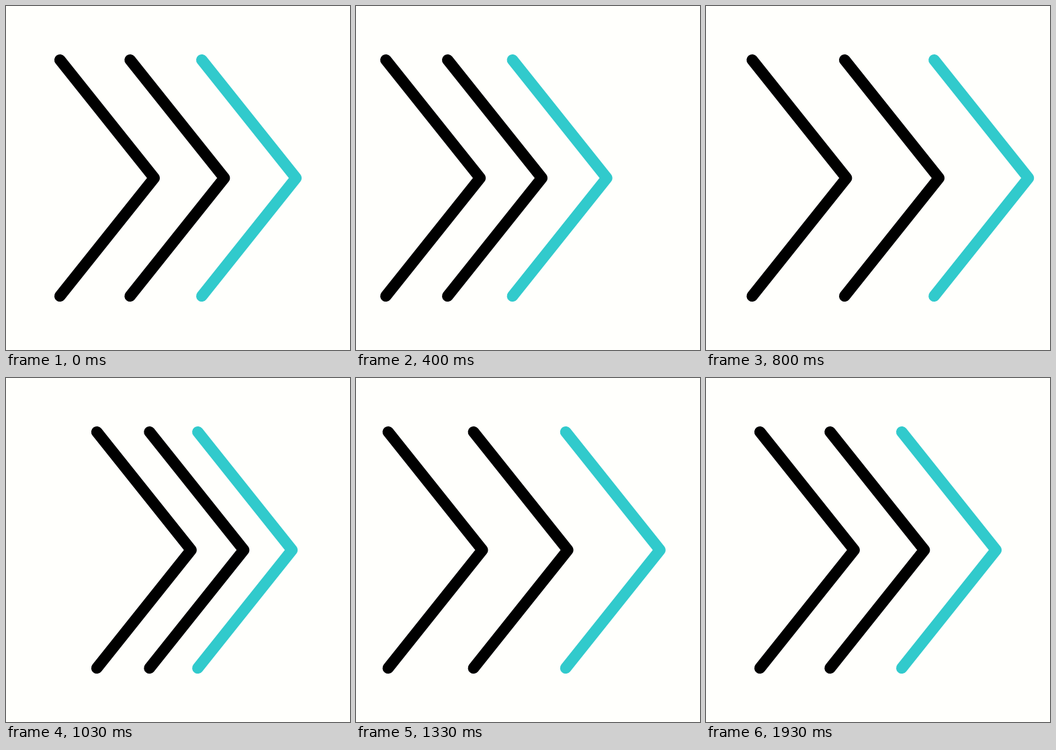
These frames come from a looping animation (512x512 px, 2010 ms). An HTML page with a canvas:

```html
<!DOCTYPE html>
<html lang="en">
<head>
<meta charset="utf-8">
<title>Chevrons</title>
<style>
html, body { margin: 0; width: 100%; height: 100%; overflow: hidden; background: #fffffc; }
canvas { display: block; width: 100vw; height: 100vh; }
</style>
</head>
<body>
<canvas id="stage" width="512" height="512"></canvas>
<script>
const ctx = document.getElementById('stage').getContext('2d');
const LOOP = 2010;
const FPS = 30;

// [step, horizontal offset]
const keys = [[0, 0], [15, -65.2], [26, 59], [34, -36], [35, -36], [43, 47], [50, 0]];

const chevrons = [
  { x: 80.3, delay: 4, color: '#000' },
  { x: 184.7, delay: 2, color: '#000' },
  { x: 291.4, delay: 0, color: '#31cacc' }
];

const ease = p => p * p * (3 - 2 * p);

function offset(step) {
  if (step <= 0) return 0;
  for (let i = 1; i < keys.length; i++) {
    const [t0, v0] = keys[i - 1];
    const [t1, v1] = keys[i];
    if (step <= t1) return v0 + (v1 - v0) * ease((step - t0) / (t1 - t0));
  }
  return 0;
}

function drawChevron(x, color) {
  ctx.strokeStyle = color;
  ctx.beginPath();
  ctx.moveTo(x, 80.3);
  ctx.lineTo(x + 140.3, 256);
  ctx.lineTo(x, 431.7);
  ctx.stroke();
}

function draw(ms) {
  // The motion advances in 30 steps per second
  const step = Math.floor((ms % LOOP + 4) * FPS / 1000);
  ctx.fillStyle = '#fffffc';
  ctx.fillRect(0, 0, 512, 512);
  ctx.lineWidth = 16.8;
  ctx.lineCap = ctx.lineJoin = 'round';
  for (const c of chevrons) drawChevron(c.x + offset(step - c.delay), c.color);
}

const start = performance.now();
function tick() {
  draw(performance.now() - start);
  requestAnimationFrame(tick);
}
tick();
</script>
</body>
</html>
```
